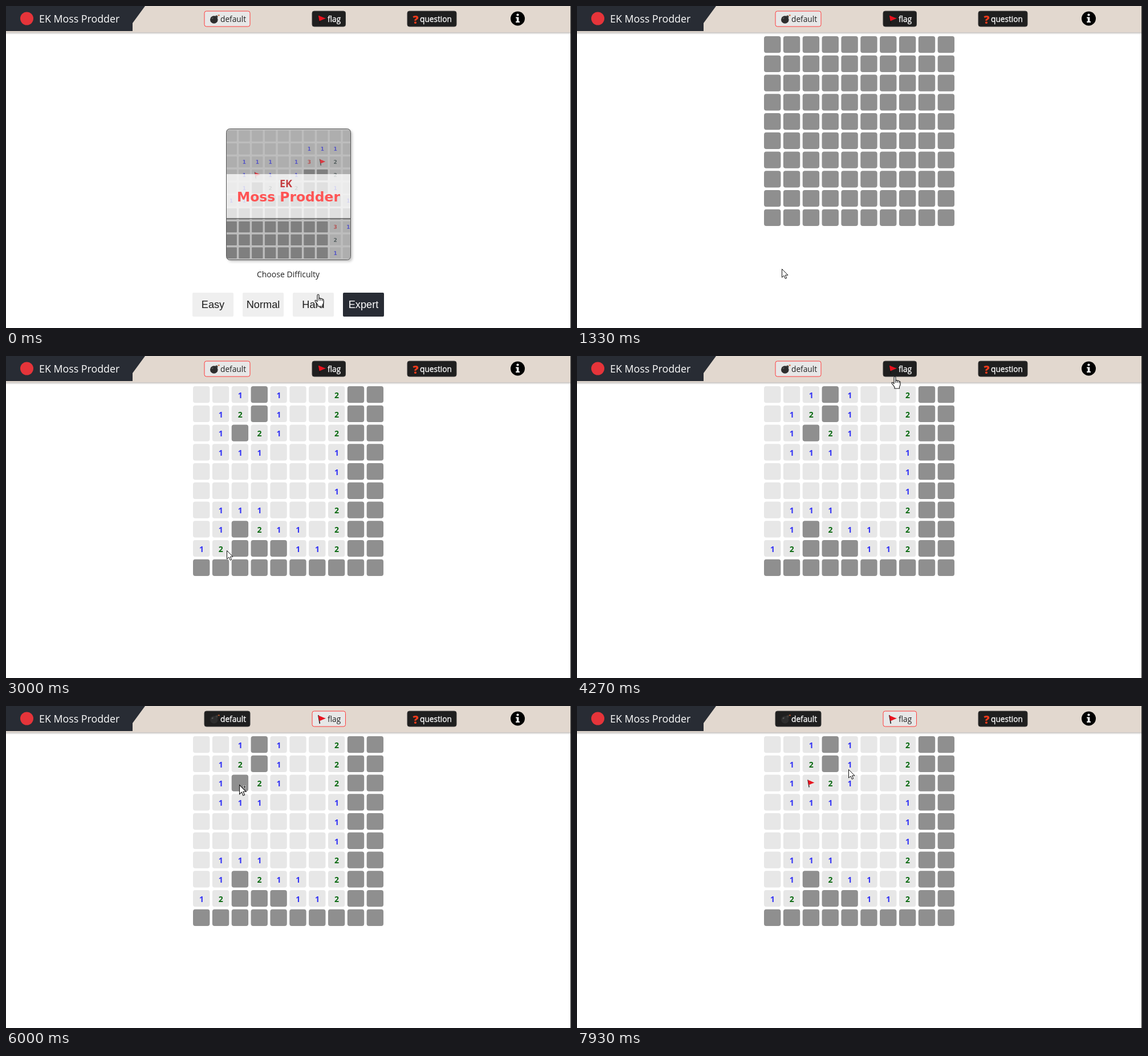
An HTML page for the animation above (8 s loop, 991 by 565 pixels).

```html
<!DOCTYPE html>
<html lang="en">
<head>
<meta charset="utf-8">
<title>Moss Prodder</title>
<style>
  html, body { margin: 0; width: 100%; height: 100%; overflow: hidden; background: #fff; }
  svg { display: block; width: 991px; height: 565px; font-family: "Open Sans", "Noto Sans", sans-serif; }
  .label { font-size: 13.7px; }
  .digit { font-size: 14px; font-weight: 700; text-anchor: middle; }
  .mini { font: 700 9px "DejaVu Sans", sans-serif; text-anchor: middle; }
  .level { font: 18.2px "Liberation Sans", Arial, sans-serif; text-anchor: middle; }
  .off { display: none; }
</style>
</head>
<body>
<svg id="stage" viewBox="0 0 991 565">
  <defs>
    <linearGradient id="fade" x2="0" y2="1">
      <stop stop-color="#c4c0bd"/><stop offset="1" stop-color="#fff"/>
    </linearGradient>
    <filter id="soft" x="-10%" y="-10%" width="120%" height="120%">
      <feDropShadow dx="3" dy="3" stdDeviation="2" flood-opacity=".22"/>
    </filter>
    <clipPath id="cardClip"><rect x="387" y="216" width="217" height="229" rx="5"/></clipPath>
    <g id="flagIcon">
      <path d="M.8 0 3.4 15" stroke="#151515" stroke-width="1.5"/>
      <path d="M.8 .4Q5 2 14 5.8Q8 8 2.6 10.6Z" fill="#e8131f"/>
    </g>
    <g id="bombIcon">
      <circle cx="6.8" cy="9" r="6.8" fill="#2d2d2d"/>
      <path d="M9 3 12 6 14 4 11 1Z" fill="#3a3a3a"/>
      <path d="M12.5 2.5Q13.5.5 15.5 1.2" fill="none" stroke="#806040"/>
      <circle cx="15.6" cy="1.4" r="1.1" fill="#d9602c"/>
      <ellipse cx="4.2" cy="6.4" rx="1.8" ry="1.2" fill="#555" transform="rotate(-40 4.2 6.4)"/>
    </g>
    <path id="arrow" d="M.5 .5V15.2L4 12 6.3 17.4 8.7 16.4 6.4 11.2H11Z" fill="#fff" stroke="#111"/>
  </defs>

  <rect y="46" width="991" height="4" fill="url(#fade)"/>
  <rect width="991" height="46" fill="#e2d8cf"/>
  <path d="M0 0H244L222 30V44H0Z" fill="#282c34"/>
  <circle cx="36.5" cy="22" r="11.5" fill="#e5343a"/>
  <text x="58" y="29" font-size="17.8" fill="#fff">EK Moss Prodder</text>
  <g id="modes"></g>
  <circle cx="897.5" cy="22" r="12.5"/>
  <circle cx="897.5" cy="15.5" r="2.1" fill="#fff"/>
  <path d="M894.2 19.5H899.3V27H901V29H894.2V27H895.8V21.5H894.2Z" fill="#fff"/>

  <g id="home">
    <rect x="386.5" y="215.5" width="218" height="230" rx="6" fill="#bdbdbd" filter="url(#soft)"/>
    <g clip-path="url(#cardClip)">
      <g id="preview"></g>
      <rect x="387" y="295" width="218" height="78" fill="#fff" fill-opacity=".76"/>
      <path d="M387 373H605" stroke="#666" stroke-width="1.6"/>
    </g>
    <rect x="386.5" y="215.5" width="218" height="230" rx="6" fill="none" stroke="#555"/>
    <g text-anchor="middle" font-weight="700">
      <text x="491" y="318" font-size="18" fill="#c43c40">EK</text>
      <text x="495.5" y="343" font-size="23.4" fill="#ff5454" font-family="DejaVu Sans, sans-serif">Moss Prodder</text>
    </g>
    <text x="495" y="476" font-size="14" text-anchor="middle" fill="#222">Choose Difficulty</text>
    <g id="levels"></g>
    <rect id="ring" x="326" y="502" width="74" height="44" rx="2" fill="none" stroke="#6f9ff0" stroke-width="1.6"/>
  </g>

  <g id="board"></g>
  <path d="M990.5 0V565" stroke="#2b2b2b"/>

  <g id="cursor">
    <path data-kind="hand" d="M0 2Q0 0 1.5 0T3 2V7Q5 6 6 7.5Q8 6.8 9 8.3Q11 8 11 10V14Q11 16 9.5 18V21H1V18.5L-3.5 12.5Q-4.5 10.5-3 10.3T0 13Z M3 7V11M6 8V11M9 9V11.5" fill="#fff" stroke="#111" stroke-width="1.1"/>
    <use data-kind="arrow" href="#arrow"/>
    <g data-kind="alias">
      <use href="#arrow" transform="scale(1.1)"/>
      <path d="M5 7 10 2M6.5 1H11.5V6" fill="none" stroke="#111" stroke-width="1.6"/>
    </g>
    <g data-kind="copy">
      <use href="#arrow" transform="scale(1.1)"/>
      <path d="M7 4H12M9.5 1.5V6.5" stroke="#fff" stroke-width="3"/>
      <path d="M7 4H12M9.5 1.5V6.5" stroke="#111" stroke-width="1.2"/>
    </g>
  </g>
</svg>

<script>
const $ = id => document.getElementById(id);
const show = (el, on) => el.classList.toggle('off', !on);

const INK = { 1: '#3232f5', 2: '#08690f' };
const MINI_INK = { 1: '#5656c6', 2: '#566060', 3: '#b45454' };

const FIELD = `..1#1..2##
.12#1..2##
.1#21..2##
.111...1##
.......1##
.......1##
.111...2##
.1#211.2##
12###112##
##########`.split('\n');

const PREVIEW = `..........
......111.
.111.13F2.
.1F1.1##2.
.1#212##1.
11#######1
##########
########31
########2.
########1.`.split('\n');

const eachCell = (rows, draw) =>
  rows.map((row, r) => [...row].map((c, i) => draw(c, i, r)).join('')).join('');

$('preview').innerHTML = eachCell(PREVIEW, (c, i, r) => {
  const x = 395.2 + i * 22.8, y = 228 + r * 22.8;
  const mark = c === 'F'
    ? `<use href="#flagIcon" transform="translate(${x - 5} ${y - 5}) scale(.75)" opacity=".75"/>`
    : MINI_INK[c] ? `<text class="mini" x="${x}" y="${y + 3.4}" fill="${MINI_INK[c]}">${c}</text>` : '';
  return `<rect x="${x - 9.7}" y="${y - 9.7}" width="19.4" height="19.4" rx="1" fill="${c === '#' ? '#7f7f7f' : '#aeaeae'}"/>${mark}`;
});

$('board').innerHTML = eachCell(FIELD, (c, i, r) => {
  const x = 328 + i * 33.85, y = 53 + r * 33.75;
  const text = INK[c] ? `<text class="digit off" x="${x + 15}" y="${y + 20.8}" fill="${INK[c]}">${c}</text>` : '';
  const flag = i === 2 && r === 2
    ? `<use id="placed" href="#flagIcon" transform="translate(${x + 8.5} ${y + 9}) scale(.87)"/>` : '';
  return `<rect data-cell="${c}" x="${x}" y="${y}" width="29.4" height="29.2" rx="4"/>${text}${flag}`;
});
const cells = [...document.querySelectorAll('[data-cell]')];
const digits = document.querySelectorAll('.digit');
const flagged = cells[22];

const MODES = [
  ['default', 348, 80, 376, '<use href="#bombIcon" x="358" y="15"/>'],
  ['flag', 537, 58.5, 564, '<use href="#flagIcon" x="547" y="16"/>'],
  ['question', 704, 86, 726, '<text x="713.5" y="31" font-size="20" font-weight="800" fill="#f23b1c">?</text>']
];
$('modes').innerHTML = MODES.map(([name, x, w, tx, icon]) =>
  `<g><rect x="${x}" y="9" width="${w}" height="27" rx="3.5"/>${icon}<text class="label" x="${tx}" y="28">${name}</text></g>`).join('');
const modes = [...$('modes').children];

$('levels').innerHTML = ['Easy', 'Normal', 'Hard', 'Expert'].map((name, i) =>
  `<g><rect x="${327 + 88 * i}" y="503" width="72" height="42" rx="2"/><text class="level" x="${363 + 88 * i}" y="530">${name}</text></g>`).join('');
const levels = [...$('levels').children];

function paintMode(el, active) {
  const box = el.firstChild, label = el.lastChild;
  box.setAttribute('fill', active ? '#e7e7e7' : '#1f1f1f');
  box.setAttribute('stroke', active ? '#ff3b3b' : '#3a3a3a');
  label.setAttribute('fill', active ? '#222' : '#fff');
  label.setAttribute('stroke', active ? 'none' : '#fff');
  label.setAttribute('stroke-width', .3);
}

function paintLevel(el, hot) {
  el.firstChild.setAttribute('fill', hot ? '#282c34' : '#efefef');
  el.lastChild.setAttribute('fill', hot ? '#fff' : '#1c1c1c');
}

// time, x, y, pointer shape from then on
const PATH = [
  [0, 546, 506, 'hand'], [60, 546, 506, 'hand'], [400, 455, 516, 'hand'], [750, 363, 524, 'hand'],
  [1250, 363, 524, 'arrow'], [1500, 352, 330, 'arrow'], [1730, 341, 134, 'alias'],
  [2000, 333, 79, 'alias'], [2600, 335, 78, 'alias'], [2730, 335, 78, 'arrow'],
  [3000, 387, 341, 'arrow'], [3200, 391, 366, 'arrow'], [3500, 398, 252, 'arrow'],
  [3900, 490, 130, 'arrow'], [4130, 554, 48, 'hand'], [4270, 556, 36, 'hand'],
  [4600, 556, 32, 'arrow'], [4900, 440, 130, 'arrow'], [5050, 405, 150, 'copy'],
  [5200, 409, 138, 'copy'], [7000, 409, 138, 'arrow'], [7350, 512, 122, 'arrow'],
  [7800, 475, 107, 'arrow'], [7930, 476, 111, 'arrow'], [8000, 476, 111, 'arrow']
];
// time, highlighted level
const HOVER = [[0, 3], [70, 2], [270, 1], [600, 0]];
const LOOP = 8000, FOCUS = 1000, START = 1200, REVEAL = 2730, FLAG_MODE = 4470, PLACE = 6500;
const lastBefore = (table, t) => table.findLastIndex(step => step[0] <= t);

function render(t) {
  show($('home'), t < START);
  show($('board'), t >= START);
  show($('ring'), t >= FOCUS);
  const hot = HOVER[lastBefore(HOVER, t)][1];
  levels.forEach((el, i) => paintLevel(el, i === hot));

  const mode = t >= FLAG_MODE ? 1 : 0;
  modes.forEach((el, i) => paintMode(el, i === mode));

  const open = t >= REVEAL, placed = t >= PLACE;
  cells.forEach(el => {
    const light = open && el.dataset.cell !== '#' || placed && el === flagged;
    el.setAttribute('fill', light ? '#e7e7e7' : '#8f8f8f');
  });
  digits.forEach(el => show(el, open));
  show($('placed'), placed);

  const k = Math.min(lastBefore(PATH, t), PATH.length - 2);
  const [t0, x0, y0, kind] = PATH[k], [t1, x1, y1] = PATH[k + 1];
  const p = (t - t0) / (t1 - t0);
  const x = Math.round(x0 + (x1 - x0) * p), y = Math.round(y0 + (y1 - y0) * p);
  $('cursor').setAttribute('transform', `translate(${x} ${y})`);
  for (const el of $('cursor').children) show(el, el.dataset.kind === kind);
}

const begin = performance.now();
function tick() {
  render((performance.now() - begin) % LOOP);
  requestAnimationFrame(tick);
}
tick();
</script>
</body>
</html>
```
